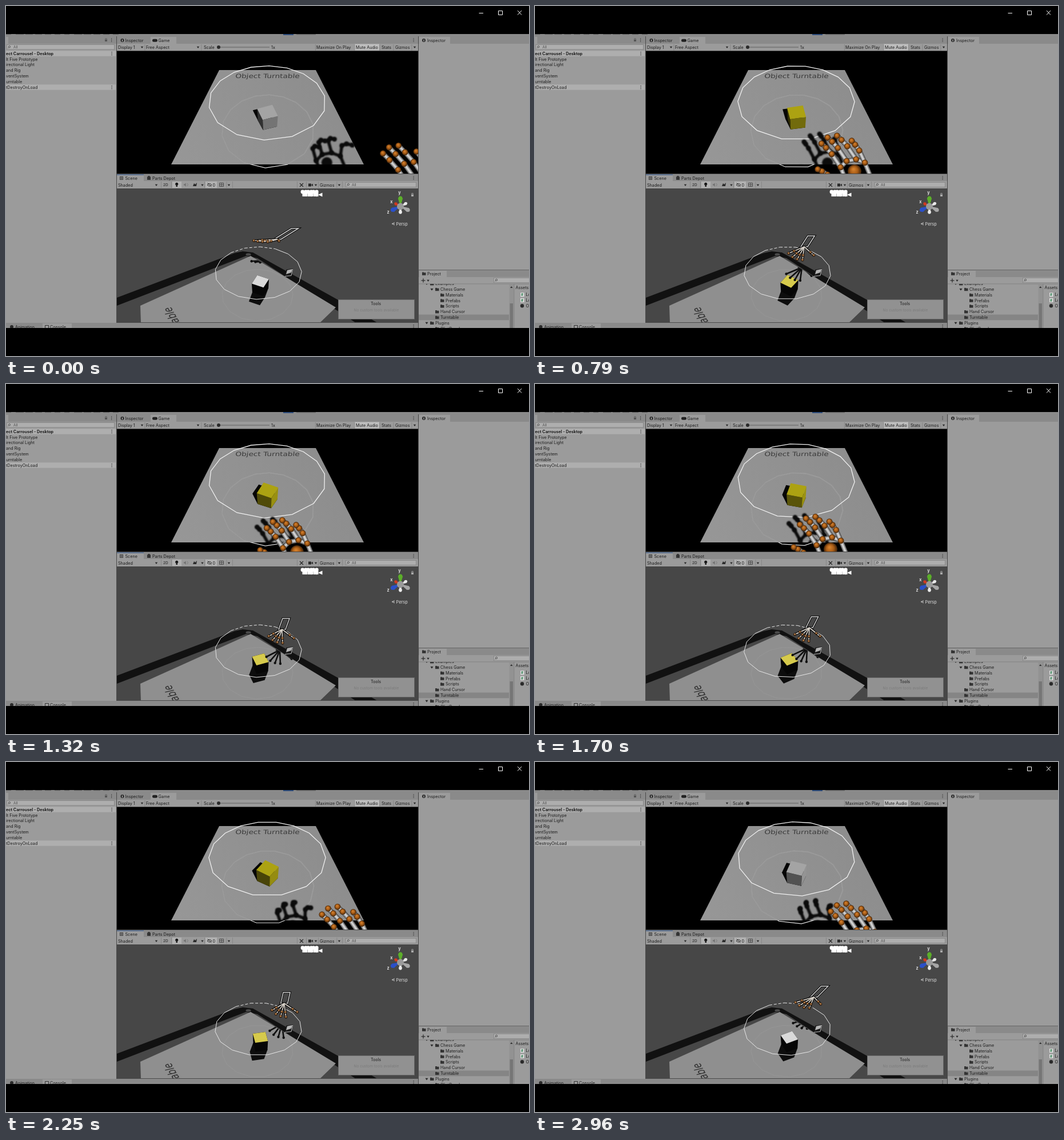
Recreate the animation shown at these times as an HTML page with a canvas. Size 915x612 px, loop 3.04 s.

```html
<!DOCTYPE html>
<html lang="en">
<head>
<meta charset="utf-8">
<title>Object Turntable</title>
<style>
html, body { margin: 0; width: 100%; height: 100%; overflow: hidden; background: #000; }
canvas { display: block; }
</style>
</head>
<body>
<canvas id="stage" width="915" height="612"></canvas>
<script>
const W = 915, H = 612, LOOP = 3040, RAD = Math.PI / 180;
const stage = document.getElementById('stage').getContext('2d');
let g = stage;

// ---------- drawing helpers ----------
const mix = (a, b, u) => a + (b - a) * u;
const rect = (x, y, w, h) => [[x, y], [x + w, y], [x + w, y + h], [x, y + h]];
const shift = (pts, dx, dy) => pts.map(([x, y]) => [x + dx, y + dy]);
const polar = (x, y, rx, ry, deg) => [x + rx * Math.cos(deg * RAD), y + ry * Math.sin(deg * RAD)];

function box(x, y, w, h, color) { g.fillStyle = color; g.fillRect(x, y, w, h); }
function trace(pts, close = true) {
  g.beginPath();
  pts.forEach(([x, y], i) => i ? g.lineTo(x, y) : g.moveTo(x, y));
  if (close) g.closePath();
}
function fill(pts, color) { trace(pts); g.fillStyle = color; g.fill(); }
function line(pts, color, width = 1, close = false) {
  trace(pts, close);
  g.strokeStyle = color;
  g.lineWidth = width;
  g.stroke();
}
function dot(x, y, r, color) {
  g.beginPath();
  g.arc(x, y, r, 0, 7);
  g.fillStyle = color;
  g.fill();
}
function text(s, x, y, { size = 7.2, color = '#1c1c1c', weight = 400, align = 'left' } = {}) {
  g.font = `${weight} ${size}px Inter, "Liberation Sans", sans-serif`;
  g.textAlign = align;
  g.textBaseline = 'middle';
  g.fillStyle = color;
  g.fillText(s, x, y + 0.5);
}
function clipped(pts, draw) {
  g.save();
  trace(pts);
  g.clip();
  draw();
  g.restore();
}

// Convex outline of a set of points
function hull(pts) {
  const half = list => list.reduce((h, p) => {
    while (h.length > 1) {
      const [a, b] = h.slice(-2);
      if ((b[0] - a[0]) * (p[1] - a[1]) - (b[1] - a[1]) * (p[0] - a[0]) > 0) break;
      h.pop();
    }
    h.push(p);
    return h;
  }, []).slice(0, -1);
  const s = [...pts].sort((a, b) => a[0] - b[0] || a[1] - b[1]);
  return [...half(s), ...half(s.reverse())];
}

// ---------- editor window ----------
const PANEL = '#9b9b9b', STRIP = '#8a8a8a', EDGE = '#4a4a4a', FIELD = '#aeaeae', INK = '#2a2a2a';
const GAME = rect(194, 79, 527, 214), SCENE = rect(194, 319, 527, 234);
const TABLE = [[373, 112], [542, 112], [626, 277], [289, 277]];
const SLAB = [[235, 524], [428, 437], [577, 527], [549, 554], [236, 554]];

function arrow(x, y, s = 2.2) { fill([[x - s, y - s * .6], [x + s, y - s * .6], [x, y + s * .9]], INK); }
function menuDots(x, y) { for (const d of [-2.5, 0, 2.5]) box(x - .5, y + d - .5, 1.2, 1.2, '#333'); }
function info(x, y) { dot(x, y, 3, INK); box(x - .5, y - 1.5, 1, 3.5, '#ccc'); }
function folder(x, y) { box(x, y - 2.5, 3, 1.5, '#333'); box(x, y - 1.8, 6.5, 4.6, '#333'); }
function dividers(y, ...xs) { for (const x of xs) box(x, y, .8, 11, '#828282'); }
function search(x, y, w) {
  box(x, y - 4.5, w, 9, '#7c7c7c');
  box(x + .7, y - 3.8, w - 1.4, 7.6, FIELD);
  g.beginPath();
  g.arc(x + 5, y - .5, 1.6, 0, 7);
  g.strokeStyle = '#444';
  g.lineWidth = .8;
  g.stroke();
  line([[x + 3.8, y + .7], [x + 2.3, y + 2.2]], '#444', .8);
}

function titleBar() {
  line([[827.5, 12.5], [835, 12.5]], '#fff');
  line(rect(861.5, 8.5, 7, 7), '#fff', 1, true);
  line([[895, 8], [902, 15.5]], '#fff');
  line([[902, 8], [895, 15.5]], '#fff');
}

function topStrip() {
  box(0, 49, W, 4, STRIP);
  for (let x = 0; x < 192; x += 17) box(x, 49, 9 + x % 6, 1.2, '#666');
  box(485, 49, 18, 2, '#2f4f80');
  box(508, 49, 34, 1.4, '#666');
}

function leftPanel() {
  box(0, 53, 193, 501, PANEL);
  box(0, 53, 193, 13, STRIP);
  box(0, 54, 4, 12, PANEL);
  box(173, 59, 4, 3, '#555');
  line([[173.8, 59], [173.8, 57], [176.2, 57], [176.2, 59]], '#555', .8);
  menuDots(184.5, 59.5);
  search(1, 71.8, 189);
  text('All', 13, 71.5, { size: 6.5, color: '#555' });
  for (const y of [83, 142]) {
    box(0, y - 4.7, 192, 9.4, FIELD);
    menuDots(185, y);
  }
  text('ect Carrousel - Desktop', 0, 83, { weight: 700 });
  ['lt Five Prototype', 'irectional Light', 'and Rig', 'ventSystem', 'urntable', 'tDestroyOnLoad']
    .forEach((s, i) => text(s, 0, 93 + i * 9.8));
}

function gameTabs() {
  box(194, 53, 527, 13, STRIP);
  box(253, 54, 45, 12, PANEL);
  info(203.5, 60);
  text('Inspector', 208.5, 60);
  g.beginPath();
  g.roundRect(256, 57.8, 9, 5, 2.4);
  g.fillStyle = '#222';
  g.fill();
  text('Game', 266.5, 60);
  menuDots(713, 59.5);
  box(194, 66, 527, 12, PANEL);
  box(610, 66.5, 43, 11, '#bdbdbd');
  dividers(67, 242.5, 341.5, 541, 609.5, 653.5, 677.5, 709.5);
  line([[372, 72], [461, 72]], '#606060', 1);
  dot(372, 72, 3, INK);
  const labels = { 'Display 1': 196, 'Free Aspect': 245, Scale: 346, '1x': 464, 'Maximize On Play': 543, 'Mute Audio': 612, Stats: 657, Gizmos: 681 };
  for (const [s, x] of Object.entries(labels)) text(s, x, 72);
  for (const x of [238, 336, 715]) arrow(x, 72);
}

function sceneTabs() {
  box(194, 294, 527, 12, STRIP);
  box(194, 295, 47, 11, PANEL);
  box(194, 294.5, 47, 1.2, '#3d5f92');
  for (const d of [0, 2.5, 5]) {
    line([[199, 298.5 + d], [205, 298.5 + d]], '#333', .8);
    line([[199.5 + d, 298], [199.5 + d, 304]], '#333', .8);
  }
  text('Scene', 208.5, 301);
  box(247, 298.5, 6, 5.5, '#333');
  box(248.5, 297, 3, 2, '#333');
  text('Parts Depot', 256, 301);
  menuDots(713, 300.5);
  box(194, 306, 527, 13, PANEL);
  dividers(307, 271, 289, 347, 385.5, 396, 509, 525, 546, 578.5, 588);
  text('Shaded', 196, 313);
  text('2D', 275, 313, { size: 6.4 });
  box(291, 307, 16, 11, '#b2b2b2');
  dot(298.7, 311.2, 2.5, '#161616');
  box(297.5, 313.5, 2.5, 2.5, '#161616');
  fill([[311, 311], [313, 311], [315, 309.5], [315, 316], [313, 314], [311, 314]], '#777');
  line([[317, 310], [318.5, 312.5], [317, 315]], '#777', .9);
  fill([[327, 315], [329, 310], [331, 312], [334, 309], [333, 315]], INK);
  box(349, 307, 20, 11, '#b2b2b2');
  line([[352, 313], [354.5, 310.5], [358, 311], [360, 313], [356, 315.3], [352, 313]], INK, .9);
  line([[352.5, 309.5], [359.5, 316]], INK, .9);
  text('0', 361.5, 313);
  line(rect(373.5, 309.5, 7, 6), '#444', .9, true);
  line([[373, 312.5], [381, 312.5]], '#444', .8);
  line([[377, 309.5], [377, 316]], '#444', .8);
  line([[514, 310], [520, 316]], INK, 1.3);
  line([[520, 310], [514, 316]], INK, 1.3);
  box(529, 310.5, 5, 5, INK);
  fill([[534, 313], [537, 310.5], [537, 315.5]], INK);
  text('Gizmos', 549, 313);
  for (const x of [263, 343.5, 390, 542, 583]) arrow(x, 313);
  search(594, 312.5, 124);
  text('All', 605, 312.5, { size: 6.5, color: '#555' });
}

function rightPanel() {
  box(722, 53, 193, 408, PANEL);
  box(722, 53, 193, 13, STRIP);
  box(723, 54, 54, 12, PANEL);
  info(731, 60);
  text('Inspector', 737, 60);
  box(722, 461, 193, 1, '#666');
  box(722, 462, 193, 101, PANEL);
  box(722, 462, 193, 12, STRIP);
  box(723, 463, 48, 11, PANEL);
  folder(728, 468);
  text('Project', 737, 468);
  line([[726.5, 480], [733.5, 480]], INK, 1.2);
  line([[730, 476.5], [730, 483.5]], INK, 1.2);
  arrow(738.5, 480);
  search(853, 479.5, 66);
  box(722, 485.5, 193, .8, '#7c7c7c');
  clipped(rect(722, 486, 193, 77), () => {
    box(722, 539.5, 158, 9.8, '#858585');
    box(880.5, 486, 8, 78, '#929292');
    box(881.5, 520, 5.5, 44, '#767676');
    fill([[882, 493], [886.5, 493], [884.2, 490]], '#333');
    box(888.5, 486, .8, 78, '#7c7c7c');
    // Leading dots give the depth, a plus marks an open folder
    ['+Examples', '.+Chess Game', '..Materials', '..Prefabs', '..Scripts', '.Hand Cursor', '.Turntable', '+Plugins', '.GlintReach']
      .forEach((entry, i) => {
        const [, depth, open, name] = entry.match(/^(\.*)(\+?)(.*)$/);
        const x = 742 + depth.length * 9, y = 485.6 + i * 9.8;
        folder(x, y);
        text(name, x + 9, y);
        if (open) arrow(x - 6, y, 2.5);
      });
    text('Assets', 891.5, 492);
    ['Lo', 'Lo', 'Ob'].forEach((s, i) => {
      const y = 504.8 + i * 9.7;
      if (s === 'Lo') {
        box(900, y - 3.5, 6.5, 7, '#ddd');
        text('#', 901, y, { size: 6, color: '#287a4a', weight: 700 });
      } else dot(903, y, 3.2, INK);
      text(s, 909.5, y);
    });
  });
}

function bottomTabs() {
  clipped(rect(0, 554, 721, 9), () => {
    box(0, 554, 721, 9, STRIP);
    box(64, 555, 51, 9, PANEL);
    dot(10, 561, 3, INK);
    text('Animation', 16, 561.5);
    line(rect(68.5, 558.5, 6, 6), '#333', 1, true);
    text('Console', 77, 561.5);
    menuDots(713, 560);
  });
}

function gameBackdrop() {
  box(194, 79, 527, 214, '#000');
  const tone = g.createLinearGradient(289, 277, 560, 112);
  tone.addColorStop(0, '#979797');
  tone.addColorStop(1, '#8d8d8d');
  fill(TABLE, tone);
  g.save();
  g.transform(1, 0, -.08, .75, 457.5, 123);
  g.font = '13.7px "DejaVu Sans", sans-serif';
  g.textAlign = 'center';
  g.textBaseline = 'middle';
  g.fillStyle = '#3a3a3a';
  g.fillText('Object Turntable', 0, 0);
  g.restore();
}

function sceneBackdrop() {
  box(194, 319, 527, 234, '#474747');
  fill([[194, 510], [400, 432], [414, 429], [432, 431], [583, 515], [650, 554], [612, 554], [440, 441], [420, 437], [194, 524]], '#111');
  fill(SLAB, '#8f8f8f');
  g.save();
  g.beginPath();
  g.ellipse(424, 434.5, 4.5, 2.2, 0, 0, 7);
  g.fillStyle = '#4a4a4a';
  g.fill();
  g.translate(283, 527);
  g.rotate(-120 * RAD);
  g.transform(.72, 0, -.3, 1, 0, 0);
  g.font = '20px "DejaVu Sans", sans-serif';
  g.textAlign = 'right';
  g.textBaseline = 'middle';
  g.fillStyle = '#2e2e2e';
  g.fillText('Turntable', 0, 0);
  g.restore();
  fill([[490, 461], [502, 459], [500, 471], [488, 473]], '#1b1b1b');
  fill([[492, 462], [501, 460], [499, 466], [490, 469]], '#b5b5b5');
  line([[488, 472.5], [499, 471.5], [501.5, 460]], '#ccc', .9);
}

function cone(x, y, deg, len, r, color) {
  const [bx, by] = polar(x, y, len, len, deg);
  fill([[x, y], polar(bx, by, r, r, deg + 90), polar(bx, by, r, r, deg - 90)], color);
  dot(bx, by, r * .82, color);
}

function sceneGizmos() {
  for (const x of [519, 528.5, 538]) {
    dot(x, 325, 3.4, '#fff');
    dot(x + 5.5, 324.8, 3.2, '#fff');
    box(x - .5, 326.5, 9, 6.5, '#fff');
    fill([[x + 8, 330], [x + 15.5, 326.5], [x + 15.5, 333.5]], '#fff');
  }
  cone(692, 350, -32, 9, 3, '#e8e8e8');
  cone(688, 349, 207, 7, 3, '#d33a20');
  cone(690, 350, 27, 15, 4, '#a6a6a6');
  cone(690, 351, -90, 15, 4.3, '#5cae2a');
  cone(690, 351, 90, 10, 3.2, '#ececec');
  cone(690, 350, 154, 15, 4.3, '#2b50c8');
  dot(690, 350.5, 6, '#9a9a9a');
  const white = { size: 7.5, color: '#eee', weight: 600, align: 'center' };
  text('y', 688.5, 326, white);
  text('x', 674.5, 342, white);
  text('z', 668.5, 360, white);
  line([[680, 378.5], [675, 380.8], [680, 383]], '#ccc', .8);
  line([[676, 380.8], [680, 380.8]], '#ccc', .8);
  text('Persp', 682.5, 381, { size: 7.4, color: '#ddd' });
  box(709, 329.5, 4, 3.5, '#aaa');
  line([[709.8, 329.5], [709.8, 327.5], [712.2, 327.5], [712.2, 329.5]], '#aaa', .8);
  box(581, 513, 134, 35, '#666');
  box(582, 514, 132, 33, '#919191');
  text('Tools', 647, 520, { align: 'center' });
  text('No custom tools available', 648, 532, { size: 6.5, color: '#7c7c7c', align: 'center' });
}

function layer(draw) {
  const c = document.createElement('canvas');
  c.width = W;
  c.height = H;
  g = c.getContext('2d');
  draw();
  g = stage;
  return c;
}
const backdrop = layer(() => {
  box(0, 0, W, H, '#000');
  titleBar();
  box(0, 49, W, 514, EDGE);
  topStrip();
  leftPanel();
  gameTabs();
  sceneTabs();
  rightPanel();
  bottomTabs();
  clipped(GAME, gameBackdrop);
  clipped(SCENE, sceneBackdrop);
});
const overlay = layer(() => clipped(SCENE, sceneGizmos));

// ---------- motion ----------
// The picture advances in even steps and holds still between them.
const LAST = 38, STEP = LOOP / (LAST + 1);
const stepAt = t => Math.min(LAST, Math.floor(t / STEP + .3));

// Swipes: turntable angle, palm in the game view, wrist and sideways turn in the scene view
const SWIPES = [
  { at: 0, spin: 25, palm: [735, 328], wrist: [475, 408], turn: -18 },
  { at: 10, spin: 34, palm: [559, 289], wrist: [471, 421], turn: -4 },
  { at: 17, spin: 70, palm: [509, 294], wrist: [483, 429], turn: 0 },
  { at: 22, spin: 60, palm: [517, 289], wrist: [480, 426], turn: -2 },
  { at: 27, spin: 4, palm: [571, 280], wrist: [467, 423], turn: -12 },
  { at: 32, spin: -39, palm: [700, 400], wrist: [523, 420], turn: 28 },
  { at: LAST, spin: -27, palm: [577, 312], wrist: [488, 411], turn: -9 }
];

function poseAt(step) {
  const i = Math.max(1, SWIPES.findIndex(s => s.at >= step));
  const a = SWIPES[i - 1], b = SWIPES[i], u = (step - a.at) / (b.at - a.at), e = u * u * (3 - 2 * u);
  const pair = key => a[key].map((v, n) => mix(v, b[key][n], e));
  return { spin: mix(a.spin, b.spin, e), turn: mix(a.turn, b.turn, e), palm: pair('palm'), wrist: pair('wrist') };
}

// ---------- turntable ----------
const SIDES = 16;
const ring = (cx, cy, rx, ry, k, spin) => Array.from({ length: SIDES }, (_, i) => {
  const a = spin + i * 360 / SIDES, d = 1 - k * Math.sin(a * RAD);
  return polar(cx, cy, rx / d, ry / d, a);
});
const square = (cx, cy, rx, ry, spin) => [0, 90, 180, 270].map(d => polar(cx, cy, rx, ry, spin + d));
const tint = (rgb, k) => `rgb(${rgb.map(v => Math.round(v * k))})`;

function gameCube(spin, lit) {
  const rgb = lit ? [172, 162, 18] : [164, 164, 164];
  const top = square(457.5, 186, 20, 14.5, spin), base = square(457.5, 205.5, 18.5, 12.5, spin);
  fill(hull([...base, ...shift(base, -9, -18)]), '#050505');
  top.forEach((p, i) => {
    const j = (i + 1) % 4, mid = (spin + 45 + i * 90) * RAD;
    if (Math.sin(mid) > 0) fill([p, top[j], base[j], base[i]], tint(rgb, .6 + .32 * Math.cos(mid)));
  });
  fill(top, tint(rgb, 1));
}

function sceneCube(spin, lit) {
  const top = square(445, 481.5, 16, 11.5, spin), base = square(445, 497, 15, 11, spin);
  fill(hull([...base, ...shift(base, -6, 16)]), '#0d0d0d');
  fill(hull([...top, ...base]), '#060606');
  fill(top, lit ? '#d6ca4c' : '#d9d9d9');
}

// ---------- hands ----------
function ball(x, y, r) {
  const tone = g.createRadialGradient(x - r * .15, y - r * .3, r * .1, x, y, r);
  tone.addColorStop(0, '#d27f2c');
  tone.addColorStop(.5, '#a85c16');
  tone.addColorStop(1, '#3f230a');
  dot(x, y, r, tone);
}
function bone(a, b) {
  line([a, b], '#3c3c3c', 8.6);
  line([a, b], '#8a8a8a', 6.8);
  line([a, b], '#cfcfcf', 3.4);
}

// Joints from knuckle to tip; the finger arches to its outer side.
function finger(knuckle, lean, len) {
  return [0, .52, .8, 1].map(u => {
    const [x, y] = polar(...knuckle, u * len, u * len, lean);
    return polar(x, y, 5 * u * (1 - u) * 2, 5 * u * (1 - u) * 2, lean + 90);
  });
}

function gameHand([x, y]) {
  const reach = 45 + .16 * (x - 509);
  const lift = .27 * (x - 446) + Math.max(0, y - 294);
  const knuckles = [0, 1, 2, 3].map(i => polar(x, y, 26, 21, -160 + i * 38));
  const fingers = knuckles.map((k, i) => finger(k, i < 3 ? -129 : -121, reach * (i < 3 ? 1 : .84)));
  fingers.push(finger([x - 32, y + 20], -144, 40));
  const sides = [knuckles[0], knuckles[3]].map(k => [k, [k[0] + 14, k[1] + 34]]);
  // The further a joint is from the tip, the higher it floats and the longer its shadow falls.
  const cast = ([px, py], u) => [px - lift * (1 + .5 * u), py - lift * (.1 + .35 * u)];

  clipped(TABLE, () => {
    g.filter = 'blur(1px)';
    g.lineCap = g.lineJoin = 'round';
    const shade = '#0b0b0b';
    for (const f of fingers) {
      const s = f.map((p, i) => cast(p, 1 - i / 3));
      line(s, shade, 5.5);
      for (const [px, py] of s) dot(px, py, 4.2, shade);
    }
    for (const part of [knuckles, ...sides]) line(part.map(p => cast(p, 1)), shade, 5.5);
    dot(...cast([x, y], 1.1), 9.5, shade);
  });

  for (const [a, b] of sides) bone(a, b);
  knuckles.slice(1).forEach((k, i) => bone(knuckles[i], k));
  ball(x, y, 12);
  for (const f of fingers) {
    f.slice(1).forEach((q, i) => bone(f[i], q));
    for (const [px, py] of f) ball(px, py, 5.4);
  }
}

function sceneHand([x, y], turn) {
  const flat = 1 - (Math.min(turn, 0) / 20) ** 2;
  const tips = [150, 128, 108, 88, 40].map(a => polar(x + turn, y, 27, 24 * flat, a));
  const ax = x + 7 - 1.3 * turn, ay = y - 19;
  const arm = [[ax - 6, ay], [ax + 6, ay], [x + 6, y], [x - 6, y]];
  clipped(SLAB, () => {
    g.translate(-4, 36);
    for (const t of tips) {
      line([[x, y], t], '#101010', 2.6);
      dot(...t, 2.2, '#101010');
    }
    line(arm, '#101010', 2, true);
  });
  line(arm, '#0a0a0a', 3.6, true);
  line(arm, '#d2d2d2', 1.5, true);
  for (const t of tips) line([[x, y], t], '#0a0a0a', 4.2);
  for (const t of tips) {
    line([[x, y], t], '#d8d2ca', 1.7);
    for (const u of [.65, 1]) {
      const px = mix(x, t[0], u), py = mix(y, t[1], u);
      dot(px, py, 2.5, '#2a180a');
      dot(px, py - .4, 1.6, '#b07a48');
    }
  }
}

// ---------- views ----------
function gameView({ spin, palm }, lit) {
  const phase = spin - 22.6, lower = ring(458, 204.5, 78.5, 60.6, .23, phase);
  line(lower, '#dcdcdc', 1.2, true);
  clipped(TABLE, () => {
    line(lower, '#949494', 2.2, true);
    line(lower, '#a0a0a0', .8, true);
  });
  gameCube(spin, lit);
  line(ring(457, 154.5, 99.5, 61.5, .23, phase), '#f0f0f0', 1.3, true);
  gameHand(palm);
}

function sceneView({ spin, wrist, turn }, lit) {
  const phase = spin - 22.6;
  clipped(SLAB, () => line(ring(440, 502, 62, 45, .08, phase), '#999', .8, true));
  sceneCube(spin + 45, lit);
  const hoop = ring(441.5, 462.4, 75.5, 45.5, .1, phase);
  hoop.forEach((p, i) => {
    const q = hoop[(i + 1) % SIDES];
    g.setLineDash((p[1] + q[1]) / 2 < 428 ? [5, 3] : []);
    line([p, q], '#e6e6e6', 1);
  });
  g.setLineDash([]);
  sceneHand(wrist, turn);
}

function draw(t) {
  const step = stepAt(t), pose = poseAt(step), lit = step >= 7 && step < 30;
  g.drawImage(backdrop, 0, 0);
  clipped(GAME, () => gameView(pose, lit));
  clipped(SCENE, () => sceneView(pose, lit));
  g.drawImage(overlay, 0, 0);
}

const start = performance.now();
function tick() {
  draw((performance.now() - start) % LOOP);
  requestAnimationFrame(tick);
}
tick();
</script>
</body>
</html>
```
